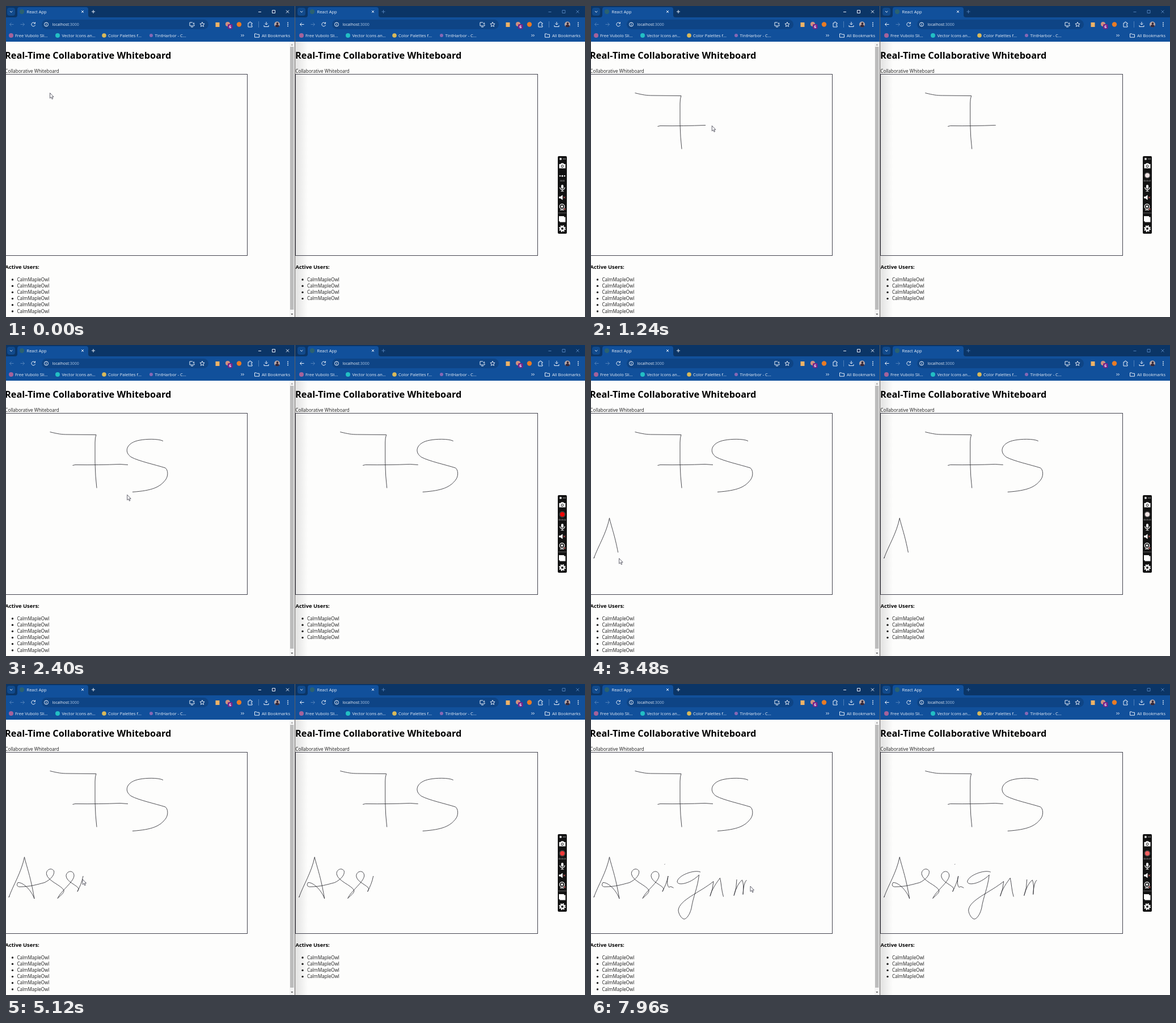
An HTML page that plays this animation: 1021 by 549 pixels, repeating every 8 s.

```html
<!DOCTYPE html>
<html lang="en">
<head>
<meta charset="utf-8">
<title>Collaborative Whiteboard</title>
<style>
  html, body { margin: 0; width: 100%; height: 100%; overflow: hidden; background: #fdfdfc; }
  svg { display: block; width: 1021px; height: 549px; font-family: "Open Sans", "Noto Sans", sans-serif; }
  .ui { font-size: 7.5px; fill: #e9eff8; }
  .page { font-size: 8.05px; fill: #1c1c1c; }
  .line { fill: none; stroke: #e9eff8; stroke-width: 1; }
  .dim { stroke: #4f7fb8; }
  #ink path { fill: none; stroke: #2e2e33; stroke-width: .85; stroke-linejoin: round; }
  .rec { fill: none; stroke: #fff; stroke-width: 1.2; }
</style>
</head>
<body>
<svg viewBox="0 0 1021 549">
  <defs>
    <linearGradient id="shade">
      <stop stop-color="#000" stop-opacity=".11"/>
      <stop offset="1" stop-color="#000" stop-opacity="0"/>
    </linearGradient>

    <g id="window">
      <rect x="-2" width="512" height="21" fill="#0b3566"/>
      <rect x="-2" y="20" width="512" height="43" fill="#11509b"/>
      <path d="M16 20q4 0 4-4V6q0-4 4-4h117q4 0 4 4v10q0 4 4 4z" fill="#11509b"/>
      <rect x="2" y="3" width="14" height="14" rx="4" fill="#114a8c"/>
      <path class="line" d="M7 9l2.200 2.200L11.400 9"/>
      <circle cx="28" cy="10" r="4.200" fill="#2b6170"/>
      <path class="line" d="M133 8l4 4m0-4l-4 4"/>

      <path class="line dim" d="M25.500 32.500h7m-3-3l3 3l-3 3"/>
      <path class="line" d="M51 30.500a3.400 3.400 0 1 0 .5 3M51.500 28.500v2.500h-2.500"/>
      <rect x="63" y="24" width="294" height="17" rx="8.500" fill="#0e4485"/>
      <circle class="line" cx="71" cy="32.500" r="3.500"/>
      <path class="line" d="M71 32v2.500m0-4.200v.9"/>
      <path class="line" d="M329 29h-5v6h8v-2m-6 4h4m1-8v3m-1.500-1.200l1.500 1.500l1.500-1.500"/>
      <path class="line" stroke-width=".8" d="M346 28.500l1.200 2.600l2.900.3l-2.200 2l.6 2.900l-2.500-1.500l-2.500 1.500l.6-2.900l-2.200-2l2.900-.3z"/>
      <rect x="369.500" y="29" width="7" height="8" fill="#eeb266"/>
      <circle cx="391" cy="32" r="4" fill="#d0917f"/>
      <rect x="391" y="32" width="8.500" height="8.500" rx="2" fill="#7b2187"/>
      <circle cx="411" cy="32.500" r="4.200" fill="#e87b25"/>
      <path class="line" d="M427 30h2.200q-.4-2.200 1.300-2.200t1.300 2.200h2.200v2.200q-1.800-.2-1.800 1.200t1.800 1.200v2.400h-7z"/>
      <path class="line dim" d="M445.500 27v11"/>
      <path class="line" d="M459 28v5m-2.500-2.300l2.500 2.500l2.500-2.500M455 34v2.500h8V34"/>
      <circle cx="478" cy="32.500" r="5" fill="#b8a7a6"/>
      <circle cx="478.500" cy="31" r="1.900" fill="#33273a"/>
      <path d="M474.500 36q0-3 3.700-3t3.700 3q-3.600 3-7.400 0z" fill="#33273a"/>
      <g fill="#e9eff8"><circle cx="497" cy="29.500" r=".9"/><circle cx="497" cy="32.500" r=".9"/><circle cx="497" cy="35.500" r=".9"/></g>

      <circle cx="9" cy="52" r="4" fill="#a5629a"/>
      <circle cx="91" cy="52" r="4" fill="#22bfc4"/>
      <circle cx="173" cy="52" r="3.800" fill="#d9b95a"/>
      <circle cx="256" cy="52" r="3" fill="#8768b5"/>
      <path class="line" d="M414.500 50l2 2l-2 2m3-4l2 2l-2 2"/>
      <path class="line" d="M438.500 49h3l1 1.200h4v5h-8z"/>
      <g class="ui">
        <text x="36.500" y="12.700">React App</text>
        <text x="81.500" y="35.200" font-size="7">localhost<tspan fill="#a9c3e2">:3000</tspan></text>
        <text x="393.200" y="39" font-size="7" font-weight="700">6</text>
        <text x="16" y="54.800">Free Vubolo Sli...</text>
        <text x="98.500" y="54.800">Vector Icons an...</text>
        <text x="180" y="54.800">Color Palettes f...</text>
        <text x="262.500" y="54.800">TintHarbor - C...</text>
        <text x="451" y="54.800">All Bookmarks</text>
      </g>

      <g class="page">
        <text x="-2" y="93.200" font-size="16.350" font-weight="700" fill="#000">Real-Time Collaborative Whiteboard</text>
        <text x="-1.700" y="118">Collaborative Whiteboard</text>
        <text x="-1.500" y="464" font-size="9.350" font-weight="700" fill="#000">Active Users:</text>
      </g>
      <rect x="-1.500" y="120.500" width="427" height="320" fill="none" stroke="#44444f"/>
    </g>
  </defs>

  <rect width="1021" height="549" fill="#fdfdfc"/>
  <rect x="510" y="63" width="22" height="486" fill="url(#shade)"/>
  <use href="#window"/>
  <use href="#window" x="512"/>
  <g id="users" class="page"></g>

  <!-- left window only -->
  <path class="line dim" d="M13.500 32.500h-7m3-3l-3 3l3 3"/>
  <path class="line" d="M151 10h6m-3-3v6M445 10.500h5m19.500-3h5v5h-5zm24.500 0l5 5m0-5l-5 5"/>
  <rect x="500" y="63" width="9" height="486" fill="#f4f4f4"/>
  <rect x="501" y="72" width="6.500" height="464" fill="#bcbcbc"/>
  <path d="M502.300 69.500l2-2.500l2 2.500z" fill="#999"/>
  <path d="M502.300 543l2 2.500l2-2.500z" fill="#555"/>
  <path d="M509.500 0v549" stroke="#64605f"/>

  <!-- right window only -->
  <path class="line" d="M525.500 32.500h-7m3-3l-3 3l3 3"/>
  <path class="line dim" d="M662.500 10h6m-3-3v6M956.500 10.500h5m19.500-3h5v5h-5zm24.500 0l5 5m0-5l-5 5"/>

  <!-- handwriting: data-t holds start and end in ms -->
  <g id="ink">
    <path data-t="80 680" d="M77.500 153.500C92 157 98 158 108 158L159 158.500Q157 163 157 172L157 208Q157.500 232 160 252.500"/>
    <path data-t="900 1247" d="M117.500 212.500L122 211.500Q165 212 201 210.500L215 211.500"/>
    <path data-t="1520 2330" d="M277 169.500C268 165 246 166 236 168C212 172 207 189 221 198C234 205 262 211 281 217C286 221 286 231 282 237C272 251 258 257 223 259.500"/>
    <path data-t="2900 3490" d="M6 374L5 376.500C13 354 27 333 32.500 305.500C37 325 43 338 50 379"/>
    <path data-t="3500 4300" d="M50 379C46 367 32 350 21 350.500C18 355 20 358 24 358C42 358 55 354 68 350.500"/>
    <path data-t="4300 5080" d="M68 350.500C79 345 86 337 84.500 330C80 323 70 328 71.500 336C74 348 97 355 102 364C103 369 96 373 91 378.500C96 366 120 349 120 338C119 327 106 330 106 339C107 350 126 355 128 361.500L126 366.500C130 358 134 350 136 339"/>
    <path data-t="5080 5290" d="M136 339C134 350 134 355 137.500 359Q140 356 145.500 360"/>
    <path data-t="5520 5560" d="M129.500 318.500L130.500 318"/>
    <path data-t="5980 6640" d="M193 332C182 327 153 338 152 349C153 357 176 352 190.500 337C188 360 180 376 177 396C174 408 168 415 164 415C159 414 154 405 154 399C156 381 192 368 216 348.500"/>
    <path data-t="6640 7150" d="M216 348.500Q215 362 210 374.500C213 362 222 350 227.500 342.500C230 353 230 364 233.500 375.500"/>
    <path data-t="7560 7960" d="M257 345Q257 360 252 373.500Q258 352 266.500 346Q270 353 268 371.500Q269 351 274 346.500L281 357"/>
  </g>
  <use href="#ink" x="511.700"/>
  <path id="cursor" d="M0 0V9.300L2.200 7.400L3.700 10.900L5.200 10.200L3.700 6.900H6.500z" fill="#fff" stroke="#3c3c4a" stroke-width=".8"/>

  <!-- recorder -->
  <rect x="973" y="265" width="16" height="137" rx="2" fill="#121212"/>
  <circle cx="978" cy="270" r="2" fill="#ddd"/>
  <path class="rec" stroke-dasharray="1.200 .8" d="M982 270h5"/>
  <path d="M975.500 279h2.500l1-1.500h4l1 1.500h2.500v7.500h-11z" fill="#fff"/>
  <circle cx="981" cy="282.700" r="2" fill="#fff" stroke="#121212"/>
  <g id="dots" fill="#fff"><circle cx="977" cy="300" r="1.200"/><circle cx="981" cy="300" r="1.600"/><circle cx="985" cy="300" r="1.200"/></g>
  <g id="record"><circle cx="981" cy="299" r="5" fill="none" stroke="#8d8d8d" stroke-width=".6"/><circle id="lamp" cx="981" cy="299" r="4"/></g>
  <text id="clock" x="981" y="310" font-size="3.300" text-anchor="middle" fill="#ccc"></text>
  <rect x="979" y="315.500" width="4" height="7" rx="2" fill="#fff"/>
  <path class="rec" d="M976.800 320q0 4.200 4.200 4.200t4.200-4.200M981 324v3m-2.500 0h5"/>
  <path d="M975 336.500h2.500l4-3v9l-4-3H975z" fill="#fff"/>
  <path d="M983 336.500l3 3m0-3l-3 3" stroke="#e06a6a"/>
  <circle class="rec" cx="980.500" cy="354" r="4.300"/>
  <circle cx="980.500" cy="354" r="2" fill="#fff"/>
  <path class="rec" d="M977 360h7"/>
  <path d="M983.500 357l3 3m0-3l-3 3" stroke="#e06a6a"/>
  <path d="M974 365.300h14" stroke="#999" stroke-width=".8" stroke-dasharray="1.500 .6"/>
  <path d="M975 371h9v1.500h2.500v9h-10V380H975z" fill="#fff"/>
  <circle cx="981" cy="393" r="5" fill="none" stroke="#fff" stroke-width="2" stroke-dasharray="2.100 1.830"/>
  <circle cx="981" cy="393" r="3.200" fill="none" stroke="#fff" stroke-width="2.400"/>
</svg>

<script>
const LOOP = 8000, LAG = 40;
const $ = id => document.getElementById(id);
const clamp = v => Math.min(1, Math.max(0, v));
const ease = v => v * v * (3 - 2 * v);

const userList = (x, count) => Array.from({ length: count }, (_, i) =>
  `<circle cx="${x + 11.5}" cy="${483 + 11.2 * i}" r="1.7"/>` +
  `<text x="${x + 19.5}" y="${485.6 + 11.2 * i}">CalmMapleOwl</text>`).join('');
$('users').innerHTML = userList(0, 6) + userList(511.5, 4);

const strokes = [...document.querySelectorAll('#ink path')].map(path => {
  const [start, end] = path.dataset.t.split(' ').map(Number);
  return { path, start, end, length: path.getTotalLength() };
});
const along = (s, t) => clamp((t - s.start) / (s.end - s.start));
const pointOn = (s, p) => s.path.getPointAtLength(s.length * p);

// The pointer follows the current stroke, or glides to the start of the next one.
function pointer(t) {
  const i = strokes.findIndex(s => t <= s.end);
  const next = strokes[i < 0 ? strokes.length - 1 : i];
  if (t >= next.start || i === 0) return pointOn(next, along(next, t));
  const last = strokes[i - 1];
  const a = pointOn(last, 1), b = pointOn(next, 0);
  const k = ease((t - last.end) / (next.start - last.end));
  return { x: a.x + (b.x - a.x) * k, y: a.y + (b.y - a.y) * k };
}

function draw(t) {
  for (const s of strokes) {
    const p = along(s, t - LAG);
    s.path.style.visibility = p > 0 ? 'visible' : 'hidden';
    s.path.style.strokeDasharray = p < 1 ? `${s.length * p} 9999` : 'none';
  }
  const { x, y } = pointer(t);
  $('cursor').setAttribute('transform', `translate(${x} ${y})`);

  const recording = t >= 80;
  $('dots').style.display = recording ? 'none' : '';
  $('record').style.display = recording ? '' : 'none';
  const red = .5 + .5 * Math.cos((t - 6680) / 720 * 2 * Math.PI);
  const other = 235 * (1 - red);
  $('lamp').setAttribute('fill', `rgb(240,${other},${other})`);
  $('clock').textContent = recording ? `00:00:0${Math.floor(t / 1000)}` : '00:00';
}

const origin = performance.now();
function tick() {
  draw((performance.now() - origin) % LOOP);
  requestAnimationFrame(tick);
}
tick();
</script>
</body>
</html>
```
